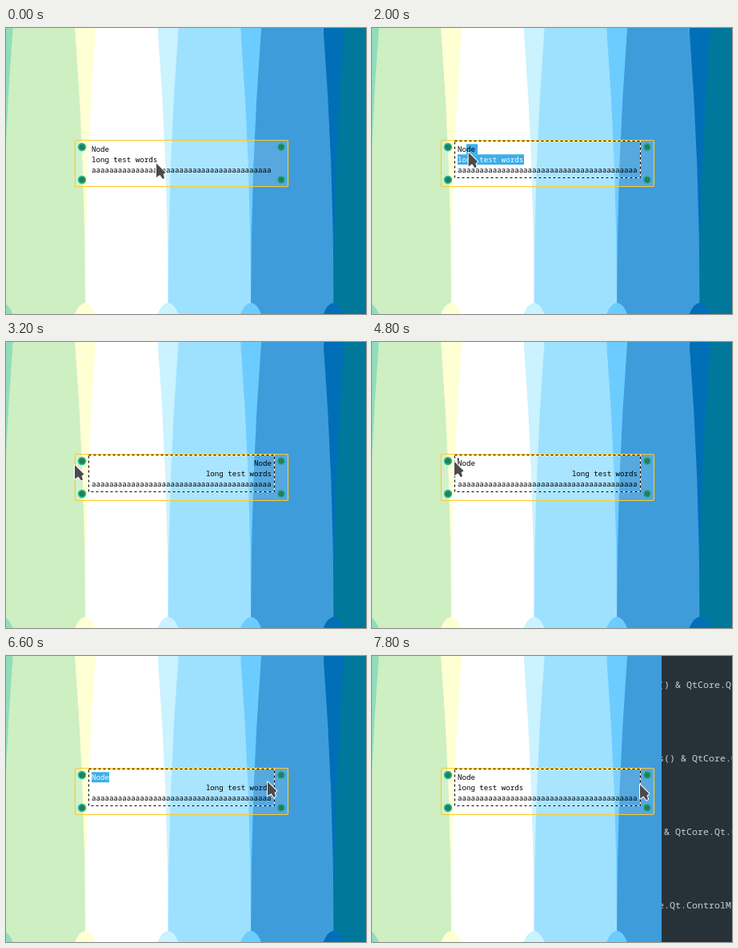
An HTML page that plays this animation: 450x358 px, repeating every 8000 ms.

```html
<!DOCTYPE html>
<html lang="en">
<head>
<meta charset="utf-8">
<title>Text node alignment</title>
<style>
html, body { margin: 0; width: 100%; height: 100%; overflow: hidden; background: #fff; }
svg { display: block; width: 450px; height: 358px; }
text { white-space: pre; }
#lines text { font: 9.15px "Noto Sans Mono", monospace; }
#panel text { font: 11.67px "Noto Sans Mono", monospace; fill: #bdd3de; }
#caret { mix-blend-mode: difference; }
</style>
</head>
<body>
<svg id="stage" viewBox="0 0 450 358" xmlns="http://www.w3.org/2000/svg">
  <g id="stripes"></g>
  <g id="panel"><rect x="362" width="88" height="358" fill="#263238"/></g>
  <rect x="86.5" y="140.5" width="266" height="58" rx="1.5" fill="#fff" fill-opacity=".12" stroke="#ffc926" stroke-width="1.2"/>
  <g id="ports"></g>
  <g id="edit" fill="none">
    <rect x="103.5" y="141.5" width="232" height="46" stroke="#fff"/>
    <rect x="103.5" y="141.5" width="232" height="46" stroke="#000" stroke-dasharray="3 3"/>
  </g>
  <g id="lines"></g>
  <rect id="caret" width="1.4" height="13" fill="#fff"/>
  <path id="mouse" d="M0 0V17.5L4.4 14.6L8 19.5L10 18.2L8.6 13.6L11.5 11.5Z" fill="#4b4b4d" stroke="#fff" stroke-width="2" stroke-linejoin="round" paint-order="stroke"/>
</svg>
<script>
const LOOP = 8000, STEP = 200;
const LEFT = 107, RIGHT = 332, TOP = 145.3, ROW = 12.9, CHAR = 5.49;
const $ = id => document.getElementById(id);

function add(parent, tag, attrs, content = "") {
  const el = document.createElementNS("http://www.w3.org/2000/svg", tag);
  for (const k in attrs) el.setAttribute(k, attrs[k]);
  el.textContent = content;
  parent.append(el);
  return el;
}

// Each band widens towards the foot and lies over the colour of the gap.
const gaps = ["#91ddbb", "#ffffd4", "#caf2ff", "#6dccff", "#006fb7"];
const bands = ["#cdefc2", "#ffffff", "#9ee1ff", "#3f9cdb", "#00789b"];
const foot = i => -4.4 + 103.5 * i;
const stripes = $("stripes");
gaps.forEach((fill, i) => add(stripes, "rect", { x: foot(i) - 13, y: 0, width: 60, height: 358, fill }));
bands.forEach((fill, i) => {
  const a = foot(i), b = foot(i + 1);
  add(stripes, "path", { fill, d: `M${a + 13} 0Q${a} 172 ${a} 345V358H${b}V345Q${b} 172 ${b - 13} 0Z` });
});
gaps.forEach((fill, i) => {
  const c = foot(i);
  add(stripes, "path", { fill, d: `M${c - 13} 358Q${c - 7} 344 ${c} 344T${c + 13} 358Z` });
});

const code = [[358, "() & QtCore.Qt"], [358, "s() & QtCore.Qt"], [365, "& QtCore.Qt.C"], [358, "e.Qt.ControlM"]];
const clip = add(add($("stage"), "clipPath", { id: "side" }), "rect", { x: 362, y: 0, width: 88, height: 358 });
$("panel").setAttribute("clip-path", "url(#side)");
code.forEach(([x, s], i) => add($("panel"), "text", { x, y: 40 + 92 * i }, s));

for (const [x, ring, r] of [[95, "#20bd92", 4.4], [344, "#1ea783", 4]])
  for (const y of [149, 190])
    add($("ports"), "circle", { cx: x, cy: y, r, fill: "#2a7b5b", stroke: ring, "stroke-width": 1.6 });

const rows = ["Node", "long test words", "a".repeat(41)].map((s, i) => ({
  mark: add($("lines"), "rect", { y: TOP + ROW * i, height: ROW, fill: "#3daee9" }),
  label: add($("lines"), "text", { y: 155.2 + ROW * i }, s),
  width: s.length * CHAR
}));

// Pointer stops: time, x, y
const path = [
  [0, 188, 169.5], [200, 203, 167], [400, 203, 167], [1000, 197, 166.5], [1200, 197, 166.5],
  [1600, 190, 159], [2200, 86, 154], [4600, 86, 154], [5000, 120, 145.5], [5600, 109, 150],
  [5800, 109, 150], [6000, 101, 148], [6200, 135, 147], [6600, 327, 157.5], [6800, 335, 161]
];
// Caret spans: from, to, x, row
const blinks = [
  [1000, 1600, RIGHT, 2], [3800, 4200, LEFT, 0], [4800, 5200, LEFT, 0],
  [5600, 6200, LEFT, 0], [6800, 7200, RIGHT, 1]
];

function pointer(t) {
  const n = path.findIndex(p => p[0] > t);
  if (n < 0) return path[path.length - 1].slice(1);
  const [a, b] = [path[n - 1], path[n]];
  const k = (t - a[0]) / (b[0] - a[0]);
  return [a[1] + (b[1] - a[1]) * k, a[2] + (b[2] - a[2]) * k];
}

const within = (t, a, b) => t >= a && t < b;
const show = (el, on) => el.setAttribute("display", on ? "inline" : "none");

// Selected part of a row as [start, end] offsets in pixels
function selection(t, row, x) {
  const col = Math.max(0, Math.round((x - LEFT) / CHAR)) * CHAR;
  if (within(t, 1800, 3200)) {
    if (row === 0 && t >= 2000) return [Math.min(col, 22), t < 3000 ? 25 : 22];
    if (row === 1) return [t < 2000 ? col : 0, 83];
  }
  if (row === 0 && within(t, 6200, 6800)) return [0, 22];
  return null;
}

function draw(time) {
  const t = Math.floor((time % LOOP) / STEP) * STEP;
  const [x, y] = pointer(t);
  $("mouse").setAttribute("transform", `translate(${x} ${y})`);
  show($("panel"), within(t, 2400, 2600) || t >= 7800);
  show($("edit"), t >= 800);

  const toRight = [within(t, 3000, 3800), within(t, 3000, 7600), false];
  rows.forEach(({ mark, label, width }, i) => {
    const start = toRight[i] ? RIGHT - width : LEFT;
    const sel = selection(t, i, x);
    label.setAttribute("x", toRight[i] ? RIGHT : LEFT);
    label.setAttribute("text-anchor", toRight[i] ? "end" : "start");
    label.setAttribute("fill", sel && sel[0] < width / 2 ? "#fff" : "#000");
    show(mark, sel);
    if (sel) {
      mark.setAttribute("x", start + sel[0]);
      mark.setAttribute("width", sel[1] - sel[0]);
    }
  });

  const blink = blinks.find(b => within(t, b[0], b[1]));
  show($("caret"), blink);
  if (blink) {
    $("caret").setAttribute("x", blink[2]);
    $("caret").setAttribute("y", TOP + ROW * blink[3]);
  }
}

const began = performance.now();
function tick() {
  draw(performance.now() - began);
  requestAnimationFrame(tick);
}
tick();
</script>
</body>
</html>
```
